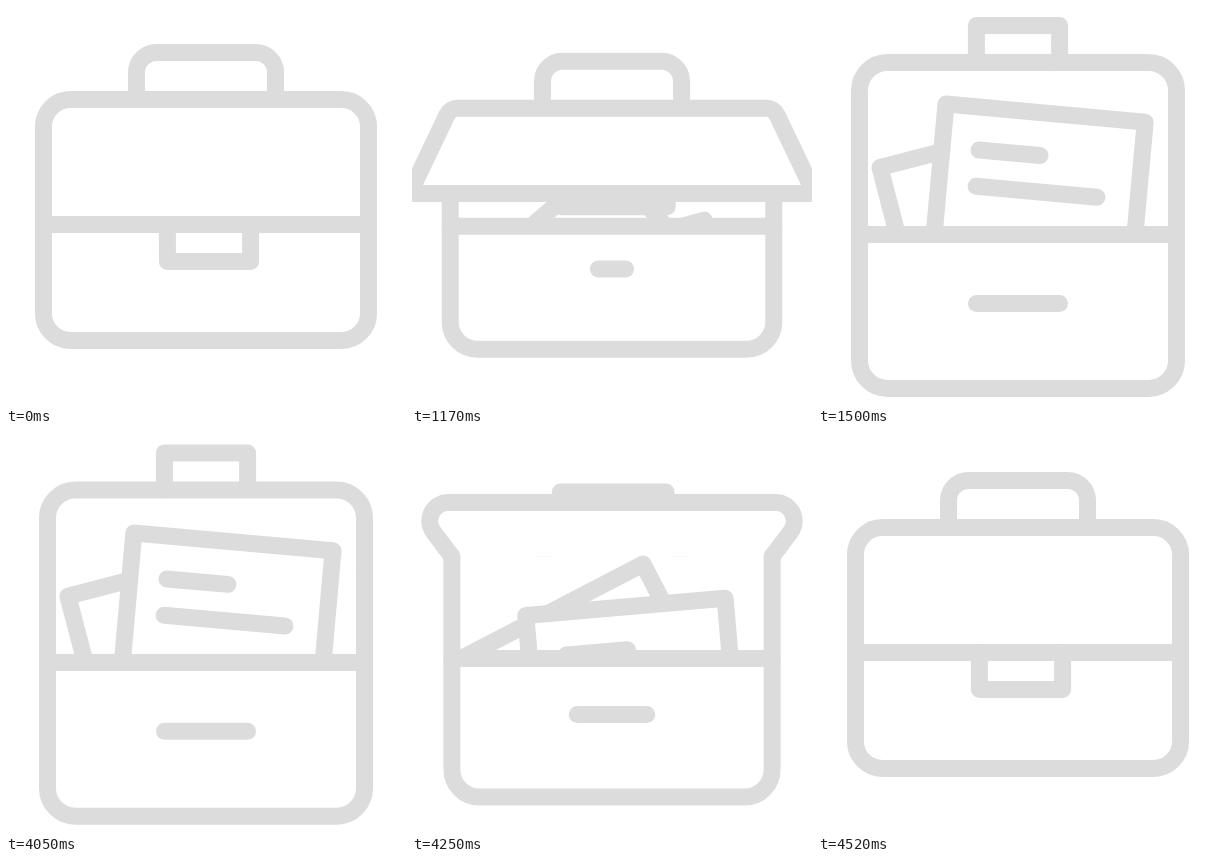
These frames come from a looping animation (400 by 400 pixels, 4.55 s). An HTML page with a canvas:

```html
<!DOCTYPE html>
<html lang="en">
<head>
<meta charset="utf-8">
<title>Briefcase</title>
<style>
html, body { margin: 0; width: 100%; height: 100%; overflow: hidden; background: #fff; }
canvas { display: block; width: 100vw; height: 100vh; }
</style>
</head>
<body>
<canvas id="stage" width="400" height="400"></canvas>
<script>
const ctx = document.getElementById('stage').getContext('2d');
const LOOP = 4550, STEPS = 20, RAD = Math.PI / 180;

const mix = (a, b, p) => a + (b - a) * p;
const ease = u => u < 0.5 ? 2 * u * u : 1 - 2 * (1 - u) * (1 - u);

// Stepped progress of a move that runs from start to end.
function progress(t, start, end) {
  if (t < start) return 0;
  const step = Math.floor((t - start) / (end - start) * (STEPS - 1) + 1e-6) + 1;
  return ease(Math.min(step / STEPS, 1));
}

function line(...pts) {
  ctx.beginPath();
  pts.forEach(([x, y]) => ctx.lineTo(x, y));
  ctx.stroke();
}

function fillStroke() {
  ctx.fill();
  ctx.stroke();
}

function drawHandle(hinge) {
  const top = hinge - 47;
  ctx.lineCap = 'butt';
  ctx.beginPath();
  ctx.moveTo(130.5, hinge);
  ctx.arcTo(130.5, top, 200, top, 20);
  ctx.arcTo(269.5, top, 269.5, hinge, 20);
  ctx.lineTo(269.5, hinge);
  ctx.stroke();
  ctx.lineCap = 'round';
}

function drawCard(x, y, angle, lines) {
  ctx.save();
  ctx.translate(x, y);
  ctx.rotate(angle * RAD);
  ctx.beginPath();
  ctx.rect(0, 0, 200, 260);
  fillStroke();
  lines.forEach(([a, b, h]) => line([a, h], [b, h]));
  ctx.restore();
}

function drawCards(left, divider, p) {
  const r = 1 - p;
  ctx.save();
  ctx.beginPath();
  ctx.rect(left, 0, 400 - 2 * left, divider);
  ctx.clip();
  drawCard(62 - 21 * r, 161.5 + 150 * r, -14.5 - 32 * r, []);
  drawCard(128 - 35 * r, 98 + 206 * r, 5.2 - 25 * r, [[37, 98.3, 42.8], [37.4, 158.8, 79.2]]);
  ctx.restore();
}

function drawBody(left, top, divider, p) {
  const right = 400 - left, bottom = mix(334.5, 382.5, p), r = 27 + p;
  ctx.beginPath();
  ctx.moveTo(left, divider);
  ctx.arcTo(left, bottom, 200, bottom, r);
  ctx.arcTo(right, bottom, right, divider, r);
  ctx.lineTo(right, divider);
  ctx.closePath();
  fillStroke();
  line([left, top], [left, divider]);
  line([right, top], [right, divider]);
  if (p > 0) {
    const half = 41.5 * (1 - (1 - p) * (1 - p)), y = mix(255.5, 297.5, p);
    line([200 - half, y], [200 + half, y]);
  }
}

function drawLid(left, hinge, q, p) {
  const right = 400 - left, turn = q * Math.PI, c = Math.cos(turn);
  const spread = 55 * Math.pow(Math.max(0, Math.sin(turn)), 1 + 1.2 * q);
  const scale = c > 0 ? 1 + spread / 200 : 1;
  const edge = hinge + mix(125, 85.5, p) * c * scale;
  const outL = left - spread, outR = right + spread;
  const length = Math.hypot(spread, edge - hinge);

  ctx.beginPath();
  if (q < 0.5) {
    const r = Math.min(27 * (1 - 2 * q), 0.6 * length);
    ctx.moveTo(outL, edge);
    ctx.arcTo(left, hinge, 200, hinge, r);
    ctx.arcTo(right, hinge, outR, edge, r);
    ctx.lineTo(outR, edge);
    ctx.closePath();
  } else {
    const half = Math.atan2(hinge - edge, spread) / 2;
    const r = Math.min(28 * Math.pow(p, 0.8), 0.8 * length * Math.tan(half));
    ctx.moveTo(left, hinge);
    ctx.arcTo(outL, edge, 200, edge, r);
    ctx.arcTo(outR, edge, right, hinge, r);
    ctx.lineTo(right, hinge);
  }
  fillStroke();

  const mid = mix(203, 200, p), w = 41.6 + spread * 0.275;
  const tip = edge + 37 * c * Math.abs(c);
  line([mid - w, edge], [mid - w, tip], [mid + w, tip], [mid + w, edge]);
}

function draw(p) {
  ctx.fillStyle = '#fff';
  ctx.fillRect(0, 0, 400, 400);
  ctx.strokeStyle = '#dcdcdc';
  ctx.lineWidth = 17;
  ctx.lineJoin = ctx.lineCap = 'round';

  // The lid swings ahead of the rest of the case.
  const r = 1 - p;
  const q = p + 0.85 * p * r * r + 0.14 * Math.sqrt(p) * Math.pow(r, 8);
  const left = mix(37.5, 41.5, p), hinge = mix(93.5, 142, p), divider = mix(218.5, 228.5, p);
  const open = q >= 0.5;

  drawHandle(hinge);
  if (open) drawLid(left, hinge, q, p);
  drawCards(left, divider, p);
  drawBody(left, hinge + 27 * Math.max(0, 1 - 2 * q), divider, p);
  if (!open) drawLid(left, hinge, q, p);
}

const begin = performance.now();
function tick() {
  const t = (performance.now() - begin) % LOOP;
  draw(progress(t, 1020, 1500) - progress(t, 4050, 4520));
  requestAnimationFrame(tick);
}
tick();
</script>
</body>
</html>
```
